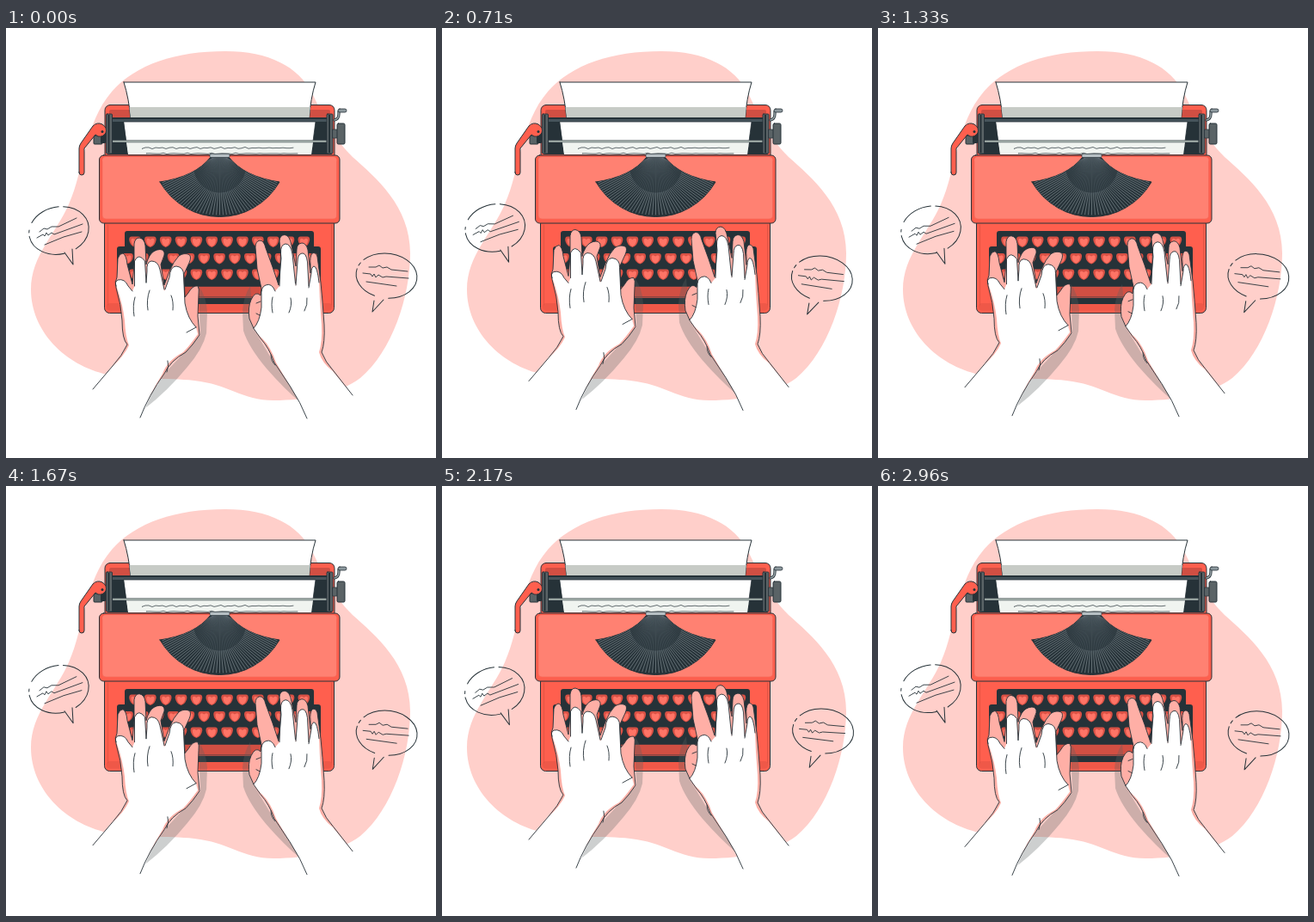
Animation, 500 px wide and 500 px high, one loop 3000 ms. Source, as an HTML page with a canvas:

```html
<!DOCTYPE html>
<html lang="en">
<head>
<meta charset="utf-8">
<title>Typing hands</title>
<style>
html, body { margin: 0; width: 100%; height: 100%; overflow: hidden; background: #fff; }
canvas { display: block; width: 500px; height: 500px; }
</style>
</head>
<body>
<canvas id="stage"></canvas>
<script>
const canvas = document.getElementById('stage');
const ctx = canvas.getContext('2d');
const scale = Math.max(1, window.devicePixelRatio || 1);
canvas.width = canvas.height = 500 * scale;

const INK = '#263238', RED = '#ff5f4e', LID = '#ff8172', DEEP = '#d14f43',
  SKIN = '#ffafa6', PINK = '#ffcfca', STEEL = '#5a6366';
const LOOP = 3000;

function shape(d, fill, stroke, width = 1) {
  const p = new Path2D(d);
  if (fill) { ctx.fillStyle = fill; ctx.fill(p); }
  if (stroke) { ctx.strokeStyle = stroke; ctx.lineWidth = width; ctx.stroke(p); }
}

function box(x, y, w, h, r, fill, stroke, width = 1) {
  ctx.beginPath();
  ctx.roundRect(x, y, w, h, r);
  if (fill) { ctx.fillStyle = fill; ctx.fill(); }
  if (stroke) { ctx.strokeStyle = stroke; ctx.lineWidth = width; ctx.stroke(); }
}

function blob() {
  shape('M255 27C306 27 340 45 356 76C370 105 381 128 403 150C430 174 470 207 470 262' +
    'C470 312 449 376 412 407C388 425 350 433 311 433C275 433 258 414 219 410' +
    'C187 406 154 411 118 403C68 392 29 352 29 304C29 265 58 239 73 205' +
    'C91 165 91 111 123 74C151 42 198 27 255 27Z', PINK);
}

function shadows() {
  const tint = 'rgba(90,98,98,.3)';
  shape('M224 300Q233 312 234 330L233 355Q229 373 211 394Q188 422 162 442L170 424L186 400L226 357Z', tint);
  shape('M284 300Q276 312 275 330L276 352Q282 371 303 396Q323 419 343 436L330 416L312 390L288 350Z', tint);
}

function scribble(x0, x1, y, amp) {
  ctx.beginPath();
  for (let x = x0; x <= x1; x += 4) {
    const k = Math.sin(x * 0.9) * Math.sin(x * 0.23);
    ctx.lineTo(x, y + amp * k * (x < 285 ? 1 : 0.3));
  }
  ctx.strokeStyle = INK;
  ctx.lineWidth = 0.7;
  ctx.stroke();
}

function carriage() {
  box(115, 89.5, 267, 70, 6, RED, INK);
  box(120, 95, 257, 12, 2, DEEP);
  shape('M137 63H360Q354 82 352.5 106H145Q143 82 137 63Z', '#fff', INK);
  shape('M143.5 92H353.8L352.5 105H145Z', '#c7cbc6');
  box(118, 104, 261, 43, 1, INK);
  box(124, 106, 249, 3, 0, '#46545b');
  shape('M137 109H360L355 147H142Z', '#fff', INK, 0.8);
  shape('M140 133H357L355 147H142Z', '#f0f4f0');
  box(124, 130.5, 249, 2.5, 0, '#a4b0ab', INK, 0.4);
  scribble(158, 335, 139.5, 1.3);
  scribble(163, 342, 146, 0.8);
  for (const x of [116.5, 373]) {
    box(x, 100, 7, 46, 1, STEEL, INK, 0.9);
    box(x + 2, 101, 2, 44, 0, INK);
  }
  box(102, 125, 10, 10, 1, STEEL, INK);
  box(110, 118, 6, 16, 1, INK);
  box(380, 118, 6, 10, 0, STEEL, INK, 0.7);
  box(385, 111, 9, 24, 1.5, STEEL, INK);
  shape('M382 107Q387 106 387 100V97', null, INK, 3.2);
  shape('M382 107Q387 106 387 100V97', null, '#9aa5a9', 1.5);
  box(386, 94, 10, 4, 2, '#8d999e', INK, 0.8);
  shape('M85 168V140Q85 137 87 134L101 114Q106 109 112 112Q118 116 116 122' +
    'Q113 127 107 126L104 124L91 140V168Q91 171 88 171Q85 171 85 168Z', RED, INK);
  ctx.fillStyle = INK;
  ctx.beginPath();
  ctx.arc(112, 120.5, 1.5, 0, 7);
  ctx.fill();
}

function keyCap(x, y) {
  ctx.save();
  ctx.translate(x, y);
  shape('M-4-6H4Q7-6 6.8-2Q6 4.5 0 6.5Q-6 4.5-6.8-2Q-7-6-4-6Z', '#d95145');
  shape('M-4.5-2Q-4-5 0-2.5Q4-5 4.7-2Q4.5 4 0 5.6Q-4.5 4-4.5-2Z', '#ff7466');
  ctx.restore();
}

function keyboard() {
  box(114.5, 222, 267, 109.5, 6, RED, INK);
  box(117, 320, 262, 8.5, 4, '#ef5848');
  shape('M118.5 229V322M378.5 229V322', null, '#d9503f', 0.7);
  shape('M141 236H355Q358 236 358 239V254H363Q366 254 366 257V297Q366 300 363 300' +
    'H132Q129 300 129 297V257Q129 254 132 254H138V239Q138 236 141 236Z', INK);
  for (let i = 0; i < 12; i++) keyCap(150 + i * 17.85, 248.5);
  for (let i = 0; i < 13; i++) keyCap(141 + i * 17.85, 268);
  for (let i = 0; i < 12; i++) keyCap(150 + i * 17.85, 286.5);
  box(150, 300.5, 200, 12.5, 1, DEEP, INK, 0.8);
  box(142, 314, 212, 7, 1, INK);
}

function fan() {
  const cx = 248.5;
  const d = 'M179 179Q220 173 238 150H259Q277 173 318 179Q307 198 288 209' +
    'Q270 219.5 248.5 219.5Q227 219.5 209 209Q190 198 179 179Z';
  shape(d, INK, INK);
  ctx.save();
  ctx.clip(new Path2D(d));
  const n = 50;
  for (let i = 0; i <= n; i++) {
    const a = Math.PI * (0.03 + 0.94 * i / n);
    const c = Math.cos(a), s = Math.sin(a);
    ctx.strokeStyle = '#8d999e';
    ctx.lineWidth = 0.6;
    ctx.beginPath();
    ctx.moveTo(cx + 31 * c, 160 + 32 * s);
    ctx.lineTo(cx + 67 * c, 176 + 41 * s);
    ctx.stroke();
    ctx.strokeStyle = '#627078';
    ctx.lineWidth = 0.4;
    ctx.beginPath();
    ctx.moveTo(cx + 8 * c, 151);
    ctx.lineTo(cx + 31 * c, 160 + 32 * s);
    ctx.stroke();
  }
  ctx.restore();
  box(237, 146.5, 23, 4, 1, '#b5bec2', INK, 0.6);
}

function typewriter() {
  carriage();
  keyboard();
  box(108.5, 148, 279.5, 79, 5, RED, INK);
  box(112, 150, 272.5, 72, 4, LID);
  shape('M112 155V218Q112 222 116 222H380Q384.5 222 384.5 218V155', null, '#f36555', 0.6);
  fan();
}

// skin silhouette, white light on top, then all lines
function hand(outline, light, lines) {
  shape(outline, SKIN);
  shape(light, '#fff');
  shape(outline, null, INK, 0.9);
  shape(lines, null, INK, 0.9);
}

function leftHand() {
  hand('M101 420L124 393Q135 381 141 368Q135 362 135 340Q134 322 128 302Q126 295 129 290' +
    'L130 268Q132 262 136 262Q140 264 141 275L147 298L149 275V251Q150 244 155 244' +
    'Q161 245 162 253L163 275Q164 270 167 265Q171 258 179 257.5Q185 258 184 264' +
    'L180 275L184 299L190 283Q195 271 201 265Q207 261 213 263.5Q216 266 213 273' +
    'L207 286L208 313L212 308Q217 299 223 300Q225 303 224 310L223 335L225 357' +
    'Q217 369 209 377Q191 387 184 402Q166 427 156 453',
  'M100 421L123 394Q137 382 143 369Q139 360 138 340Q136 322 129 302Q126 296 130 293' +
    'Q138 291 142 300L147 306L149.5 300V271Q154 261 161.5 271L163 296L164 283' +
    'Q163 272 169 271Q177 271 179 281L184 306L190 290Q191 277 198 277' +
    'Q207 278 206.5 288L208 320Q211 338 221 348L223 356Q213 370 206 377' +
    'Q187 387 182 402Q166 427 156 455Z',
  'M128 300Q126 295 130 293Q138 291 142 300L147 306M149.5 300V271Q154 261 161.5 271' +
    'L163 296M163 296L164 283Q163 272 169 271Q177 271 179 281L184 304' +
    'M185 304L190 290Q191 277 198 277Q207 278 206.5 288L208 320Q211 338 221 348' +
    'M150 313Q147 323 149 335M167 305Q163 316 165 328M192 311Q195 318 194 328' +
    'M221 348L210 354M188 387Q190 393 187 400');
}

function rightHand() {
  hand('M403 427L381 399Q371 388 367 377Q371 366 370 345L368 318L366 296L362 266' +
    'Q360 260 356 262Q353 266 354 275V285L351 258Q349 250 344 250Q338 251 338 258' +
    'L337 277L332 253Q330 241 324 240.5Q318 241 318 248L320 268L317 299L310 278' +
    'L302 256Q300 247 295 247Q290 248 290 255L292 280L297 303L296 311' +
    'Q290 305 285 316Q281 325 283 338Q287 350 296 361Q306 372 312 389' +
    'L330 416Q343 436 350 454',
  'M404 428L380 399Q367 389 364 377Q368 365 367 345L365 318L364 296Q362 277 358 277' +
    'Q355 278 355 285L352 302L350.5 272Q349 261 344 262Q339 263 339 272L337 301' +
    'L333 263Q331 251 325 251Q319 252 319.5 262L318 300L313 306Q309 296 302 299' +
    'Q296 301 297 312L297 325Q295 342 288 349Q293 357 298 361Q308 371 314 389' +
    'L330 416Q343 436 350 456Z',
  'M352 302L355 285Q355 278 358 277Q362 277 364 296M352 300L350.5 272' +
    'Q349 261 344 262Q339 263 339 272L337 299M336.5 297L333 263Q331 251 325 251' +
    'Q319 252 319.5 262L318 300M313 306Q309 296 302 299Q296 301 297 312V325' +
    'Q295 342 288 349M310 313Q308 321 310 331M331 314Q333 322 329 331' +
    'M350 314Q351 322 347 329M291 320L296 318M291 332L295 334' +
    'M308 380Q308 387 313 392');
}

function ovalArcs(x, y, rx, ry, tilt, spans) {
  const rad = Math.PI / 180;
  ctx.strokeStyle = INK;
  ctx.lineWidth = 1;
  for (const [a, b] of spans) {
    ctx.beginPath();
    ctx.ellipse(x, y, rx, ry, tilt * rad, a * rad, b * rad);
    ctx.stroke();
  }
}

function bubbles(angle) {
  ctx.save();
  ctx.translate(250, 250);
  ctx.rotate(angle * Math.PI / 180);
  ctx.translate(-250, -250);
  ovalArcs(61.5, 235.5, 35, 27.5, -12, [[89, 181], [190, 196], [214, 279], [288, 425]]);
  shape('M68 261L78 275L77 257', null, INK);
  shape('M39 237L44 233L48 234L53 231L61 231L82 221M36 244L43 240L45 242L47 238L49 241' +
    'L53 238L56 240L89 228M45 252L67 243L88 237', null, INK, 0.9);
  ovalArcs(442.5, 288, 35.5, 26, 6, [[-143, 82], [109, 190], [199, 207]]);
  shape('M428 317L426 330L439 316', null, INK);
  shape('M422 278L430 278L434 276L438 279L443 278L448 281L467 283M415 285L424 286L426 289' +
    'L428 286L430 290L433 287L438 290L442 289L468 291M419 295L454 300', null, INK, 0.9);
  ctx.restore();
}

// 0 to 1 and back to 0 over one period
function triangle(t, period) {
  const p = (t % period) / period;
  return 1 - Math.abs(2 * p - 1);
}

function draw(t) {
  const lift = -10 * triangle(t, LOOP / 2);
  const sway = 2 * triangle(t + LOOP / 4, LOOP) - 1;
  ctx.setTransform(scale, 0, 0, scale, 0, 0);
  ctx.fillStyle = '#fff';
  ctx.fillRect(0, 0, 500, 500);
  ctx.lineCap = ctx.lineJoin = 'round';
  blob();
  typewriter();
  ctx.save();
  ctx.translate(0, lift);
  shadows();
  leftHand();
  rightHand();
  ctx.restore();
  bubbles(sway);
}

const start = performance.now();
function tick() {
  draw((performance.now() - start) % LOOP);
  requestAnimationFrame(tick);
}
tick();
</script>
</body>
</html>
```
